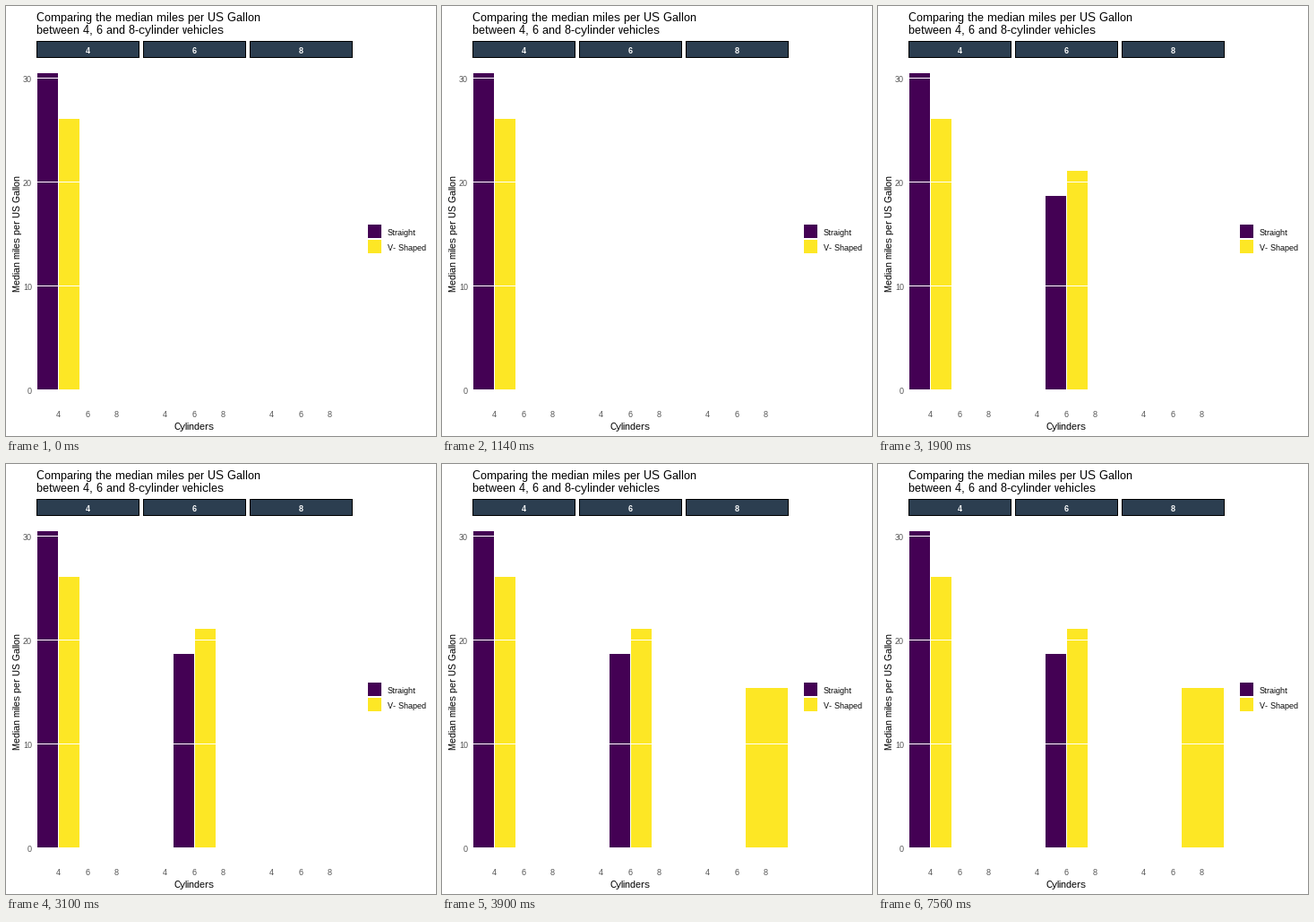
A matplotlib script that plays this animation: 480x480 px, repeating every 10000 ms.

```python
import matplotlib.pyplot as plt
from matplotlib.animation import FuncAnimation
from matplotlib.patches import Rectangle

SIZE, DPI = 480, 100
FRAMES, INTERVAL = 100, 100
PURPLE, YELLOW = "#440154", "#FDE725"
NAVY, GREY = "#2C3E50", "#4D4D4D"
BASE, UNIT = 428, 11.6          # y of zero, pixels per mile
PANEL_X, PANEL_W = (34, 153, 272), 115

plt.rcParams.update({
    "font.family": "Liberation Sans",
    "text.hinting": "native",
    "text.hinting_factor": 1,
    "toolbar": "None",
})

fig = plt.figure(figsize=(SIZE / DPI, SIZE / DPI), dpi=DPI, facecolor="white")
ax = fig.add_axes([0, 0, 1, 1])
ax.set_xlim(0, SIZE)
ax.set_ylim(SIZE, 0)
ax.axis("off")


def box(x0, y0, x1, y1, color, z=1):
    patch = Rectangle((x0, y0), x1 - x0, y1 - y0, facecolor=color,
                      linewidth=0, antialiased=False, zorder=z)
    return ax.add_patch(patch)


def label(x, y, text, px, color="black", ha="left", **kw):
    ax.text(x, y, text, fontsize=px * 72 / DPI, color=color, ha=ha,
            va="baseline", zorder=5, **kw)


def bar(x0, x1, miles, color):
    return box(x0, round(BASE - miles * UNIT), x1, BASE, color, z=2)


# Titles
label(34, 17, "Comparing the median miles per US Gallon", 13)
label(34, 31, "between 4, 6 and 8-cylinder vehicles", 13)
label(209.5, 473, "Cylinders", 11, ha="center")
ax.text(16, 319, "Median miles per US Gallon", fontsize=11 * 72 / DPI,
        rotation=90, ha="right", va="bottom", rotation_mode="default",
        zorder=5).set(ha="left", va="baseline", rotation_mode="anchor")

# Panel strips and x labels
for x, name in zip(PANEL_X, "468"):
    box(x, 39, x + PANEL_W, 58, "black")
    box(x + 1, 40, x + PANEL_W - 1, 57, NAVY, z=2)
    label(x + 57, 53, name, 9, "white", "center", weight="bold")
    for i, tick in enumerate("468"):
        label(x + 24 + 32.6 * i, 459, tick, 9, GREY, "center")

# y labels and grid lines, which cross the bars
for miles in (0, 10, 20, 30):
    y = round(BASE - miles * UNIT)
    label(29, y + 5, str(miles), 9, GREY, "right")
    box(34, y, 387, y + 1, "white", z=3)

# Legend
for y, color, name in ((244, PURPLE, "Straight"), (261, YELLOW, "V- Shaped")):
    box(404, y, 419, y + 15, color)
    label(426, y + 12, name, 9)

# Bars of each panel with the time they appear
groups = [
    (0, [bar(35, 58, 30.4, PURPLE), bar(59, 82, 26, YELLOW)]),
    (1900, [bar(187, 210, 18.65, PURPLE), bar(211, 234, 21, YELLOW)]),
    (3900, [bar(339, 386, 15.35, YELLOW)]),
]


def update(frame):
    now = frame * INTERVAL
    shown = []
    for start, bars in groups:
        for patch in bars:
            patch.set_visible(now >= start)
            shown.append(patch)
    return shown


anim = FuncAnimation(fig, update, frames=FRAMES, interval=INTERVAL,
                     repeat=True, repeat_delay=0, blit=False)
plt.show()
```
